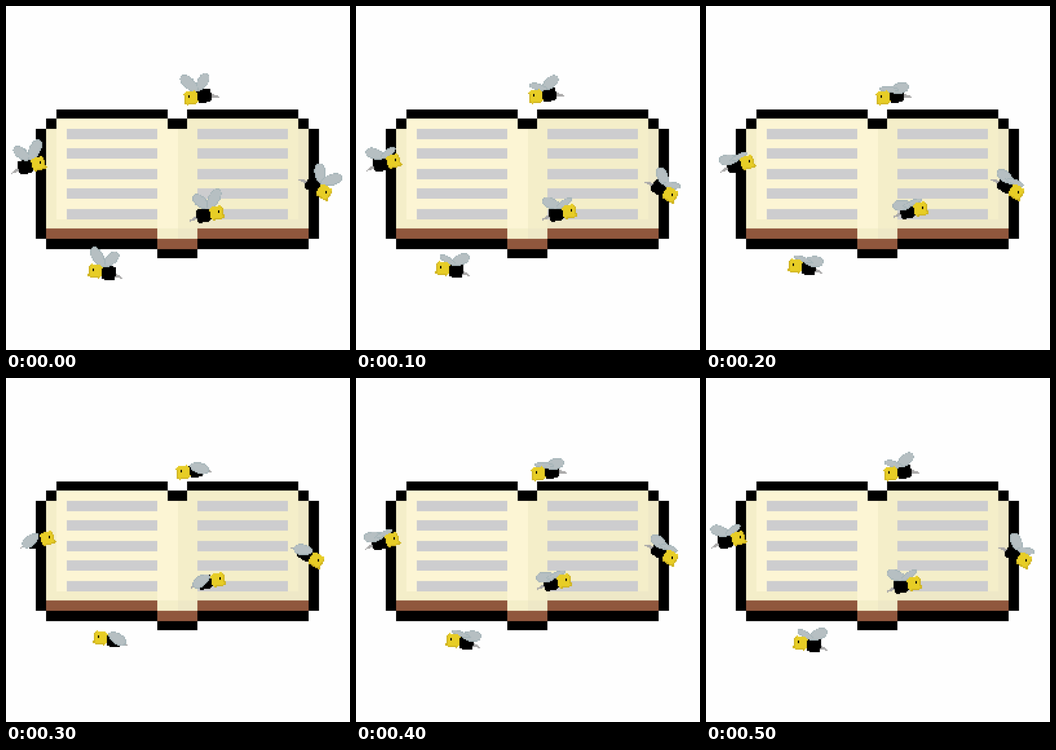
An HTML page with a canvas that plays this animation: 748x748 px, repeating every 600 ms.

```html
<!DOCTYPE html>
<html lang="en">
<head>
<meta charset="utf-8">
<title>Bees around a book</title>
<style>
  html, body { margin: 0; width: 100%; height: 100%; overflow: hidden; background: #fefefe; }
  canvas { display: block; }
</style>
</head>
<body>
<canvas id="stage" width="748" height="748"></canvas>
<script>
const SIZE = 748, CELLS = 266, CELL = SIZE / CELLS;
const STEP = 100, STEPS = 6;

const PAPER = '#fefefe', INK = '#000', BROWN = '#90573d', LINE = '#cdcdcf';
const CREAM = '#fcf5d4', SAND = '#f4eec9', DUSK = '#eee8c7';
const YELLOW = '#e7cd26', OCHRE = '#d0b41e', TAIL = '#aaa9a9';
const WING = '#b6bfc2', WING_EDGE = '#a5b4b8';

const stage = document.getElementById('stage').getContext('2d');

// Cells are painted three pixels wide, then scaled smoothly to the stage.
const sheet = document.createElement('canvas');
sheet.width = sheet.height = CELLS * 3;
const ctx = sheet.getContext('2d');
ctx.scale(3, 3);

function box(color, x0, y0, x1, y1) {
  ctx.fillStyle = color;
  ctx.fillRect(x0, y0, x1 - x0, y1 - y0);
}

// The book is laid out on 28 by 15 coarse blocks.
const column = n => Math.round(23.1 + 7.815 * n);
const row = n => Math.round(79.6 + 7.72 * n);

function block(color, x0, y0, x1, y1) {
  box(color, column(x0), row(y0), column(x1), row(y1));
}

function pair(left, right, x0, y0, x1, y1) {
  block(left, x0, y0, x1, y1);
  block(right, 28 - x1, y0, 28 - x0, y1);
}

function drawBook() {
  pair(SAND, DUSK, 1, 2, 14, 13);
  pair(CREAM, SAND, 2, 1, 14, 11);
  pair(CREAM, SAND, 12, 11, 14, 12);
  pair(BROWN, BROWN, 1, 12, 12, 13);
  block(BROWN, 12, 13, 16, 14);
  pair(INK, INK, 2, 0, 13, 1);
  pair(INK, INK, 1, 1, 2, 2);
  pair(INK, INK, 0, 2, 1, 13);
  pair(INK, INK, 1, 13, 12, 14);
  block(INK, 13, 1, 15, 2);
  block(INK, 12, 14, 16, 15);
  for (let y = 2; y < 11; y += 2) pair(LINE, LINE, 3, y, 12, y + 1);
}

// Orbit centre in cells, radius and phase (degrees) per axis, tilt, facing.
const BEES = [
  { x: 28.6, y: 122.7, rx: 4.1, px: 145, ry: 2.5, py: -113, tilt: -13, face: 1 },
  { x: 163.3, y: 157.9, rx: 2.7, px: 101, ry: 1.9, py: -9, tilt: -10, face: 1 },
  { x: 140, y: 72.3, rx: 3.6, px: -46, ry: 2.2, py: -112, tilt: 9, face: -1 },
  { x: 71, y: 203, rx: 3.8, px: -116, ry: 2.6, py: -34, tilt: -8, face: -1 },
  { x: 242.9, y: 142.5, rx: 3.5, px: -35, ry: 3.7, py: 60, tilt: 33, face: 1 }
];

const rad = deg => deg * Math.PI / 180;
const orbit = (mid, radius, phase, step) =>
  Math.round(mid + radius * Math.cos(rad(step * 360 / STEPS - phase)));

// Shapes map a point, in pixels from the head centre, to a colour or nothing.
function wing(x0, y0, x1, y1, half) {
  const len = Math.hypot(x1 - x0, y1 - y0);
  const ux = (x1 - x0) / len, uy = (y1 - y0) / len;
  return (x, y) => {
    const along = (x - x0) * ux + (y - y0) * uy, t = along / len;
    if (t < 0 || t > 1) return;
    const side = Math.abs((y - y0) * ux - (x - x0) * uy);
    const reach = half * Math.sqrt(4 * t * (1 - t)) * (0.86 + 0.28 * t);
    if (side > reach) return;
    return reach - side < 2.2 || len - along < 2.4 ? WING_EDGE : WING;
  };
}

// The back wing swings down and over the body.
function backWing(flap) {
  const lift = rad(52 - 18 * flap - 2.6 * flap * flap), len = 43;
  return wing(-17, -13, -17 - len * Math.cos(lift), -13 - len * Math.sin(lift), 12);
}

// The front wing folds flat behind the head.
function frontWing(flap) {
  const open = 0.3 ** flap;
  return wing(-17 - 10 * flap, -12, 14 - 4 * flap, -18 - 32 * open, 5.5 + 7 * open);
}

function roundBox(x, y, half) {
  const ax = Math.abs(x), ay = Math.abs(y);
  return Math.max(ax, ay) < half && ax + ay < half * 1.72;
}

function tail(x, y) {
  const t = (x + 61) / 18;
  if (t > 0 && t < 1 && Math.abs(y - 7 + 5 * t) < 1.3 + 3 * t) return TAIL;
}

function body(x, y) {
  if (roundBox(x + 29.5, y, 15.2)) return INK;
}

function head(x, y) {
  if (roundBox(x, y, 14.5)) return x > 11.5 || y > 11.5 ? OCHRE : YELLOW;
  if (Math.hypot(x - 13, y - 10) < 3.5) return OCHRE;
}

function drawBee(bee, step) {
  const flap = 3 - Math.abs(3 - step);
  const hx = orbit(bee.x, bee.rx, bee.px, step);
  const hy = orbit(bee.y, bee.ry, bee.py, step);
  const c = Math.cos(rad(bee.tilt)), s = Math.sin(rad(bee.tilt));

  function paint(shape) {
    for (let j = -27; j <= 27; j++) {
      for (let i = -27; i <= 27; i++) {
        const dx = (i + 0.5) * CELL * bee.face, dy = (j + 0.5) * CELL;
        const color = shape(dx * c + dy * s, dy * c - dx * s);
        if (color) box(color, hx + i, hy + j, hx + i + 1, hy + j + 1);
      }
    }
  }

  function paintEye(x, y) {
    const ex = Math.round(hx + bee.face * (x * c - y * s) / CELL - 0.5);
    const ey = Math.round(hy + (x * s + y * c) / CELL - 1);
    box(INK, ex, ey, ex + 1, ey + 2);
  }

  const folded = flap === 3;
  paint(tail);
  paint(body);
  if (!folded) {
    paint(backWing(flap));
    paint(frontWing(flap));
  }
  paint(head);
  paintEye(3.5, -2.5);
  if (folded) paint(backWing(flap));
}

function draw(step) {
  box(PAPER, 0, 0, CELLS, CELLS);
  drawBook();
  BEES.forEach(bee => drawBee(bee, step));
  stage.drawImage(sheet, 0, 0, SIZE, SIZE);
}

let start, shown;
function tick(now) {
  start ??= now;
  const step = Math.floor((now - start) / STEP) % STEPS;
  if (step !== shown) draw(shown = step);
  requestAnimationFrame(tick);
}
requestAnimationFrame(tick);
</script>
</body>
</html>
```
